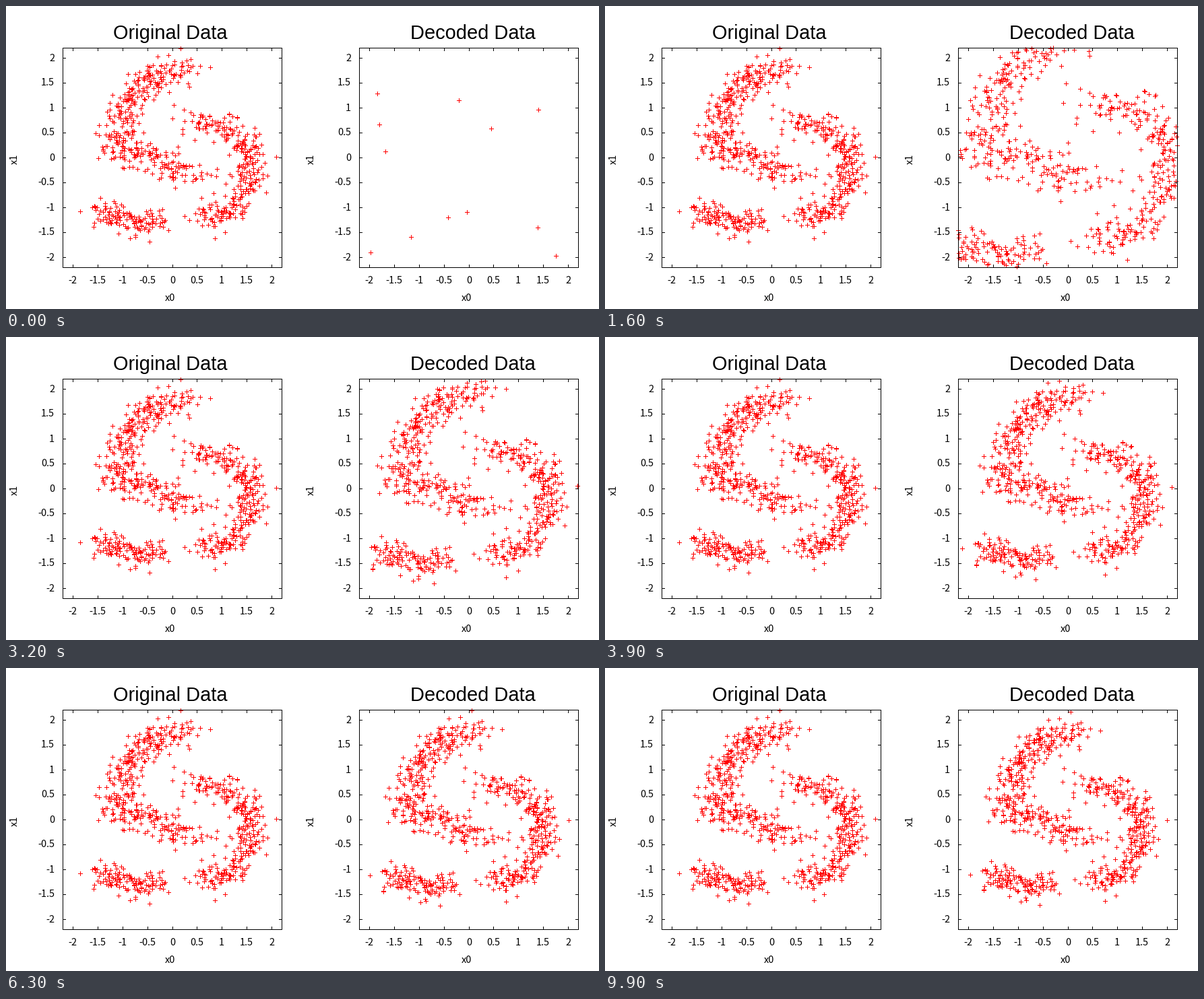
Write a matplotlib script that moves like this. It is 880 px wide and 450 px high and loops after 10000 ms.

```python
import numpy as np
import matplotlib.pyplot as plt
from matplotlib.animation import FuncAnimation

W, H, DPI = 880, 450, 100
FRAMES, STEP = 100, 100
PX = 72 / DPI
UX, UY = 325 / 4.4, 326 / 4.4
LEFT_X, RIGHT_X, MID_Y = 247, 687, 225.5
LIMIT = 2.2

plt.rcParams["path.simplify"] = False

# key points of the three strokes the samples scatter around
HOOK = [(0.42, 1.78), (-0.1, 1.7), (-0.6, 1.5), (-0.95, 1.1), (-1.1, 0.6),
        (-1.15, 0.18), (-0.6, 0.08), (-0.2, -0.1), (0.65, -0.42)]
BOW = [(0.3, 0.8), (0.75, 0.62), (1.1, 0.58), (1.5, 0.3), (1.62, -0.1),
       (1.5, -0.7), (1.2, -1.05), (0.8, -1.2), (0.4, -1.2)]
DASH = [(-1.6, -1.05), (-1.2, -1.12), (-0.8, -1.3), (-0.3, -1.28)]


def scatter(rng, stroke, n, spread):
    """Noisy samples along a polyline, denser away from its ends."""
    p = np.array(stroke)
    length = np.hypot(*np.diff(p, axis=0).T)
    s = np.concatenate([[0], np.cumsum(length)]) / length.sum()
    u = rng.beta(1.2, 1.3, n)
    path = np.column_stack([np.interp(u, s, p[:, k]) for k in (0, 1)])
    return path + spread * rng.standard_t(8, (n, 2))


def make_data():
    rng = np.random.default_rng(7)
    return np.concatenate([scatter(rng, HOOK, 365, 0.15),
                           scatter(rng, BOW, 290, 0.14),
                           scatter(rng, DASH, 125, 0.14)])


def decode(pts, t):
    """Symmetric linear map that relaxes to a shifted identity."""
    scale = 1 / (1 - 0.92 * np.exp(-0.7 * t))
    shear = 0.33 * np.exp(-0.75 * t)
    drift = 0.16 * np.exp(-0.43 * t)
    return pts @ [[scale, shear], [shear, scale]] - [0.1 + drift, 0.024]


def crosses(pts, cx):
    """Pixel-aligned plus signs as one path broken by NaNs."""
    pts = pts[np.abs(pts).max(axis=1) <= LIMIT]
    x = np.floor(cx + pts[:, 0] * UX) + 0.5
    y = np.floor(MID_Y - pts[:, 1] * UY) + 0.5
    gap = np.full_like(x, np.nan)
    xs = np.stack([x - 3.5, x + 3.5, gap, x, x, gap], axis=1)
    ys = np.stack([y, y, gap, y - 3.5, y + 3.5, gap], axis=1)
    return xs.ravel(), ys.ravel()


fig = plt.figure(figsize=(W / DPI, H / DPI), dpi=DPI, facecolor="white")
ax = fig.add_axes([0, 0, 1, 1])
ax.set_xlim(0, W)
ax.set_ylim(H, 0)
ax.axis("off")


def line(x, y, color="black", z=3):
    return ax.plot(x, y, color=color, lw=PX, antialiased=False, snap=False,
                   solid_capstyle="butt", solid_joinstyle="miter", zorder=z)[0]


def label(x, y, text, size=14.5, font="Noto Sans CJK JP", **kw):
    kw = {"ha": "center", "va": "baseline", **kw}
    ax.text(x, y, text, fontsize=size * PX, family=font, color="black", **kw)


def panel(cx, title, title_x):
    l, r, t, b = cx - 162.5, cx + 162.5, 62.5, 388.5
    line([l, r, r, l, l], [t, t, b, b, t])
    for v in np.arange(-2, 2.1, 0.5):
        x = np.floor(cx + v * UX) + 0.5
        y = np.floor(MID_Y - v * UY) + 0.5
        for edge, inward in ((t, 4.5), (b, -4.5)):
            line([x, x], [edge, edge + inward])
        for edge, inward in ((l, 4.5), (r, -4.5)):
            line([edge, edge + inward], [y, y])
        label(x - 0.5, 411.5, f"{v:g}")
        label(l - 12.5, y + 4, f"{v:g}", ha="right")
    label(cx - 3.5, 438.5, "x0")
    label(l - 71.5, 227, "x1", rotation=90, va="center")
    label(title_x, 49, title, 29, "Liberation Sans")


data = make_data()
panel(LEFT_X, "Original Data", 243.5)
panel(RIGHT_X, "Decoded Data", 692.5)
line(*crosses(data, LEFT_X), "red", 2)
decoded = line([], [], "red", 2)


def update(i):
    decoded.set_data(*crosses(decode(data, i * STEP / 1000), RIGHT_X))
    return [decoded]


anim = FuncAnimation(fig, update, frames=FRAMES, interval=STEP,
                     repeat=True, repeat_delay=0, blit=False)
plt.show()
```
